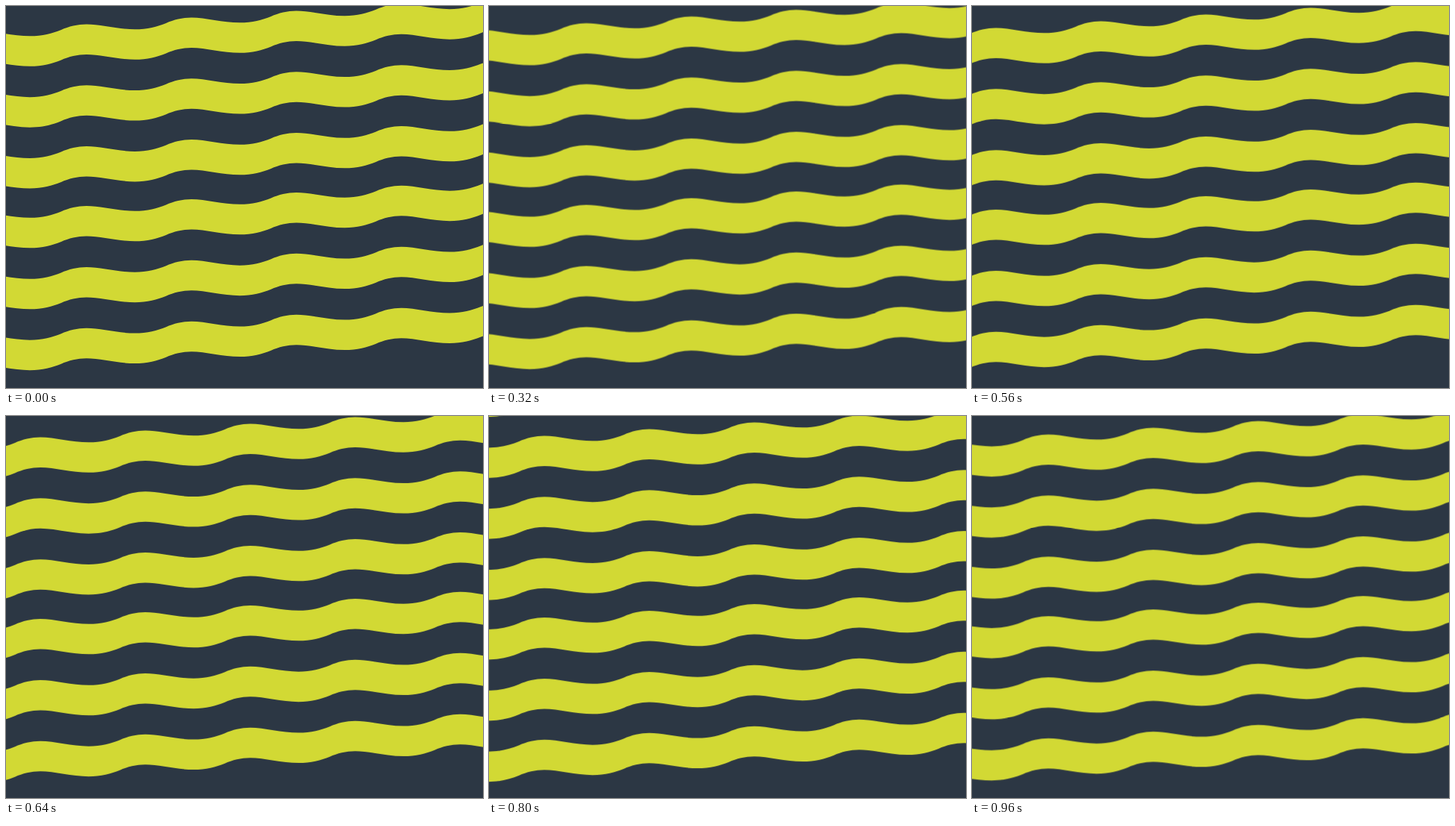
An HTML page for the animation above (1040 ms loop, 640 px wide and 512 px high).

```html
<!DOCTYPE html>
<html lang="en">
<head>
<meta charset="utf-8">
<title>Waves</title>
<style>
  html, body { margin: 0; height: 100%; overflow: hidden; background: #2c3744; }
  svg { display: block; width: 100%; height: 100%; }

  /* One loop moves the waves by one wavelength: slow for four steps, then faster. */
  #waves { animation: drift 1040ms infinite; }
  @keyframes drift {
    0% { transform: translate(0, 0); animation-timing-function: steps(4, end); }
    30.769% { transform: translate(22.53px, -1.448px); animation-timing-function: steps(8, end); }
    92.307% { transform: translate(135.17px, -8.688px); animation-timing-function: step-end; }
    100% { transform: translate(140.8px, -9.05px); }
  }
</style>
</head>
<body>
<svg viewBox="0 0 640 512" preserveAspectRatio="none">
  <g id="waves"></g>
</svg>
<script>
  const LENGTH = 140.8, RISE = 9.05, BAND = 40.5;
  const YELLOW = '#d2d934', DARK = '#2c3744';
  const tops = [-81.8, 0, 81.8, 163.6, 243.5, 325.4, 407.3];

  // One wavelength: up to the crest, down to the trough, up to the next wave.
  const wave = 'c10 -4.6 22 -7.5 34 -7.5' +
               'c19 0 42 6.8 64.8 6.8' +
               `c17 0 30 -3.5 42 ${0.7 - RISE}`;
  const startX = 74 - 3 * LENGTH, startY = 32 + 3 * RISE;

  // Everything below a wavy edge, painted from top to bottom.
  function layer(y, fill) {
    const d = `M${startX} ${startY + y}${wave.repeat(8)}V720H${startX}Z`;
    return `<path d="${d}" fill="${fill}"/>`;
  }

  document.getElementById('waves').innerHTML =
    tops.map(y => layer(y, YELLOW) + layer(y + BAND, DARK)).join('');
</script>
</body>
</html>
```
